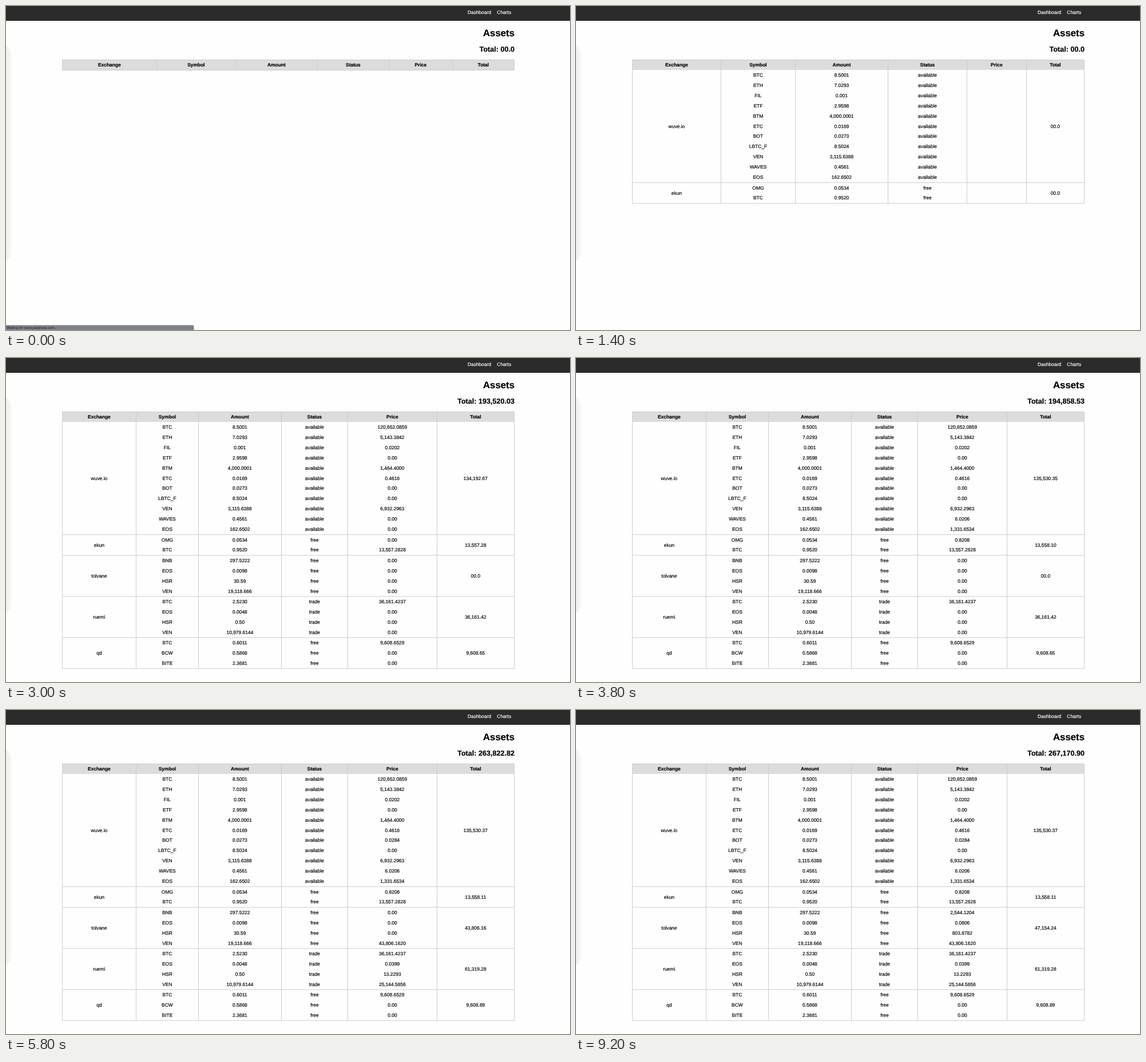
Animation, 986 px wide and 568 px high, one loop 9400 ms. Source, as an HTML page:

```html
<!DOCTYPE html>
<html lang="en">
<head>
<meta charset="utf-8">
<title>Assets</title>
<style>
  html, body { margin: 0; width: 100%; height: 100%; overflow: hidden; background: #fefefe; }
  svg { display: block; font: 8.45px "Liberation Sans", Arial, sans-serif; }
  text { text-rendering: geometricPrecision; stroke: #000; stroke-width: 0.18; }
  .nav text { fill: #fff; stroke: #fff; }
  .b { font-weight: bold; }
  .mid { text-anchor: middle; }
  .end { text-anchor: end; }
  .line { stroke: #cdcdcd; stroke-width: 1; }
</style>
</head>
<body>
<svg width="986" height="568" viewBox="0 0 986 568">
  <defs>
    <linearGradient id="edge" gradientUnits="userSpaceOnUse" x1="0" y1="0" x2="9" y2="0">
      <stop offset="0" stop-color="#eeeeee"/>
      <stop offset="1" stop-color="#f8f8f8"/>
    </linearGradient>
  </defs>
  <rect x="-40" y="70" width="49" height="377" rx="14" fill="url(#edge)"/>
  <rect width="986" height="26" fill="#2b2b2b"/>
  <g class="nav">
    <text x="806.9" y="14.2">Dashboard</text>
    <text x="858.3" y="14.2">Charts</text>
  </g>
  <text class="b end" x="889" y="52.7" font-size="16.8">Assets</text>
  <text class="b end" x="889" y="80.2" font-size="12.6" id="sum"></text>
  <g id="table"></g>
  <g id="status">
    <path d="M0 559.5H326.5Q328.5 559.5 328.5 561.5V568H0Z" fill="#7e8188"/>
    <text x="1" y="566" font-size="6.1" fill="#222" style="stroke:none">Waiting for www.yepanata.com...</text>
  </g>
</svg>
<script>
const LOOP = 9400, STEP = 200, ROW = 17.92, TOP = 94, BODY = 112.1;
const HEADS = ['Exchange', 'Symbol', 'Amount', 'Status', 'Price', 'Total'];

// Column edges from a given time on
const COLUMNS = [
  [0, [98, 263, 401, 544, 669, 780, 888]],
  [800, [98, 253, 383, 545, 683, 787, 888]],
  [1800, [98, 227, 336, 481, 597, 753, 888]],
];

// shown: rows appear, priced: price cells appear, dust: [time, small rest in the total]
// rows: symbol, amount, price, time the price arrives
const GROUPS = [
  { name: 'wuve.io', state: 'available', shown: 800, priced: 1800, dust: [2600, 0.0234], rows: [
    ['BTC', '8.5001', 120652.0859, 1800],
    ['ETH', '7.0293', 5143.3842, 2200],
    ['FIL', '0.001', 0.0202, 2600],
    ['ETF', '2.9598'],
    ['BTM', '4,000.0001', 1464.4, 2800],
    ['ETC', '0.0169', 0.4616, 2400],
    ['BOT', '0.0273', 0.0284, 4200],
    ['LBTC_F', '8.5024'],
    ['VEN', '3,115.6388', 6932.2963, 3000],
    ['WAVES', '0.4561', 6.0206, 3200],
    ['EOS', '162.6502', 1331.6534, 3400]] },
  { name: 'ekun', state: 'free', shown: 1200, priced: 1800, dust: [4200, 0.0084], rows: [
    ['OMG', '0.0534', 0.8208, 3200],
    ['BTC', '0.9520', 13557.2828, 1800]] },
  { name: 'tolvane', state: 'free', shown: 1600, priced: 2400, rows: [
    ['BNB', '297.5222', 2544.1204, 6800],
    ['EOS', '0.0098', 0.0806, 6400],
    ['HSR', '30.59', 803.8782, 6600],
    ['VEN', '19,118.666', 43806.162, 5200]] },
  { name: 'ruemi', state: 'trade', shown: 1800, priced: 2200, rows: [
    ['BTC', '2.5230', 36161.4237, 2200],
    ['EOS', '0.0048', 0.0399, 4400],
    ['HSR', '0.50', 13.2293, 4800],
    ['VEN', '10,979.6144', 25144.5856, 5000]] },
  { name: 'qd', state: 'free', shown: 2200, priced: 2600, dust: [4600, 0.2391], rows: [
    ['BTC', '0.6011', 9608.6529, 2600],
    ['BCW', '0.5868'],
    ['BITE', '2.3681']] },
];

const $ = id => document.getElementById(id);
const money = (n, digits) => n.toLocaleString('en-US',
  { minimumFractionDigits: digits, maximumFractionDigits: digits });
const total = n => n ? money(n, 2) : '00.0';
const line = (x1, y1, x2, y2) =>
  `<line class="line" x1="${x1}" y1="${y1}" x2="${x2}" y2="${y2}"/>`;

function draw(t) {
  const cols = COLUMNS.filter(c => c[0] <= t).pop()[1];
  const left = cols[0], right = cols[6] + 1;
  const cell = (col, y, text, cls = '') =>
    `<text class="mid ${cls}" x="${(cols[col] + cols[col + 1]) / 2 + 0.4}" y="${y + 3}">${text}</text>`;
  const rule = y => line(left, y, right, y);

  let out = `<rect x="${left}" y="${TOP}" width="${right - left}" height="18" fill="#dcdcdc"/>`;
  out += rule(TOP + 0.4);
  HEADS.forEach((h, i) => out += cell(i, 103, h, 'b'));

  let y = BODY, sum = 0;
  for (const g of GROUPS) {
    if (t < g.shown) continue;
    const height = g.rows.length * ROW;
    let worth = g.dust && t >= g.dust[0] ? g.dust[1] : 0;
    g.rows.forEach(([symbol, amount, price, at], i) => {
      const mid = y + ROW * (i + 0.5) - 0.1;
      const known = t >= at;
      if (known) worth += price;
      out += cell(1, mid, symbol) + cell(2, mid, amount) + cell(3, mid, g.state);
      if (t >= g.priced) out += cell(4, mid, known ? money(price, 4) : '0.00');
    });
    out += cell(0, y + height / 2, g.name) + cell(5, y + height / 2, total(worth));
    y += height + 0.45;
    out += rule(y);
    sum += worth;
  }
  if (y === BODY) out += rule(y + 0.4);
  cols.forEach(x => out += line(x + 0.5, TOP, x + 0.5, y + 0.5));

  $('table').innerHTML = out;
  $('sum').textContent = 'Total: ' + total(sum);
  $('status').style.display = t < 600 ? '' : 'none';
}

const start = performance.now();
let last = -1;
function tick() {
  const t = Math.floor((performance.now() - start) % LOOP / STEP) * STEP;
  if (t !== last) draw(last = t);
  requestAnimationFrame(tick);
}
tick();
</script>
</body>
</html>
```
